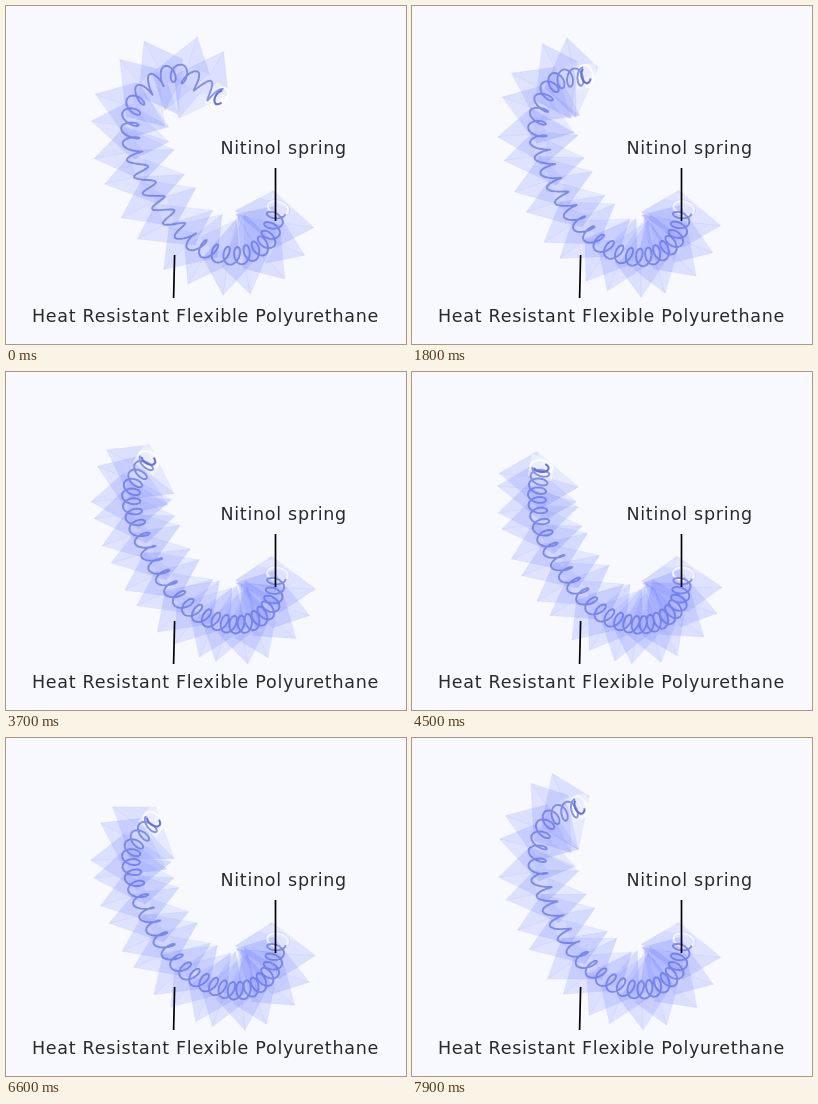
An HTML page with a canvas for the animation above (8 s loop, 400 by 338 pixels).

```html
<!DOCTYPE html>
<html lang="en">
<head>
<meta charset="utf-8">
<title>Soft actuator</title>
<style>
  html, body { margin: 0; width: 100%; height: 100%; overflow: hidden; background: #f7f9ff; }
  canvas, svg { position: absolute; left: 0; top: 0; width: 400px; height: 338px; }
  text { font: 17.5px "DejaVu Sans", sans-serif; letter-spacing: .71px; fill: #2a2a2e; }
  line { stroke: #000; stroke-width: 1.7; }
</style>
</head>
<body>
<canvas id="stage"></canvas>
<svg viewBox="0 0 400 338">
  <text x="214.5" y="147.5">Nitinol spring</text>
  <text x="26" y="316">Heat Resistant Flexible Polyurethane</text>
  <line x1="269.5" y1="162" x2="269.5" y2="215"/>
  <line x1="168.6" y1="249" x2="167.6" y2="292"/>
</svg>
<script>
const LOOP = 8000, STEP = 100, PERIOD = 10000;
const UNITS = 17, COILS = 27;

// Spine points, from the fixed end to the free tip, for four amounts of bend.
const BENDS = [1, .713, .437, .016];
const POSES = [
  [271,205, 259,237, 228,250, 187,236, 150,193, 126,140, 130,95, 169,67, 213,91],
  [271,205, 261,236, 234,251, 199,244, 165,214, 138,168, 125,119, 141,78, 173,70],
  [271,205, 262,236, 237,252, 205,247, 172,224, 145,183, 127,136, 129,97, 157,73],
  [271,205, 265,234, 244,250, 218,252, 187,239, 157,206, 133,165, 125,127, 128,97]
];

const canvas = document.getElementById('stage');
const ctx = canvas.getContext('2d');
const ratio = window.devicePixelRatio || 1;
canvas.width = 400 * ratio;
canvas.height = 338 * ratio;
ctx.scale(ratio, ratio);

// Smooth blend of the poses through all four bends.
function spineAt(bend) {
  const weights = BENDS.map((b, i) =>
    BENDS.reduce((w, c, j) => i === j ? w : w * (bend - c) / (b - c), 1));
  const flat = POSES[0].map((_, k) => POSES.reduce((s, p, i) => s + p[k] * weights[i], 0));
  const points = [];
  for (let k = 0; k < flat.length; k += 2) points.push([flat[k], flat[k + 1]]);
  return points;
}

function catmull(a, b, c, d, f) {
  return b + .5 * f * (c - a + f * (2*a - 5*b + 4*c - d + f * (3*(b - c) + d - a)));
}

function pointOn(spine, u) {
  const last = spine.length - 1;
  const s = Math.max(0, Math.min(1, u)) * last;
  const i = Math.min(last - 1, Math.floor(s));
  const get = (k, axis) => {
    if (k < 0) return 2 * spine[0][axis] - spine[1][axis];
    if (k > last) return 2 * spine[last][axis] - spine[last - 1][axis];
    return spine[k][axis];
  };
  return [0, 1].map(a => catmull(get(i - 1, a), get(i, a), get(i + 1, a), get(i + 2, a), s - i));
}

// Position, heading and local stretch of the spine at u.
function frameOn(spine, u) {
  const e = .01, [x, y] = pointOn(spine, u);
  const lo = Math.max(0, u - e), hi = Math.min(1, u + e);
  const p = pointOn(spine, lo), q = pointOn(spine, hi);
  const dx = q[0] - p[0], dy = q[1] - p[1];
  return { x, y, angle: Math.atan2(dy, dx), pace: Math.hypot(dx, dy) / (hi - lo) };
}

// The cells lean against the spine in its middle stretch.
const lean = u => .28 * Math.sin(Math.PI * u);

// Offset by `along` the heading and `out` to its left.
function offset(f, along, out, skew = 0) {
  const c = Math.cos(f.angle + skew), s = Math.sin(f.angle + skew);
  return [f.x + c * along + s * out, f.y + s * along - c * out];
}

function polygon(points, fill) {
  ctx.beginPath();
  points.forEach(p => ctx.lineTo(p[0], p[1]));
  ctx.closePath();
  ctx.fillStyle = fill;
  ctx.fill();
}

const blue = a => `rgba(92,106,255,${a})`;

function drawUnit(f, u, i) {
  const at = (a, o) => offset(f, a, o, lean(u));
  const side = i % 2 ? 1 : -1;
  const left = at(3 * side, 40), right = at(-3 * side, -40);
  const front = at(27, 9), back = at(-27, -9);
  const hub = at(4, 9 * side);
  polygon([left, front, right, back], blue(.1));
  polygon([left, front, hub], blue(.08));
  polygon([right, back, hub], blue(.12));
  polygon([left, hub, back], blue(.05));
  ctx.strokeStyle = blue(.1);
  ctx.lineWidth = .8;
  ctx.beginPath();
  [left, front, right, back, left, hub, right].forEach(p => ctx.lineTo(p[0], p[1]));
  ctx.stroke();
}

function drawSpring(spine) {
  ctx.beginPath();
  const steps = COILS * 20;
  for (let k = 0; k <= steps; k++) {
    const u = k / steps, f = frameOn(spine, u);
    const phase = u * COILS * 2 * Math.PI;
    const tight = Math.max(0, Math.min(1, (480 - f.pace) / 140));
    const p = offset(f, 5.2 * tight * Math.sin(phase), 9 * Math.cos(phase), lean(u));
    ctx.lineTo(p[0], p[1]);
  }
  ctx.strokeStyle = 'rgba(98,112,232,.75)';
  ctx.lineWidth = 1.9;
  ctx.lineJoin = 'round';
  ctx.stroke();
}

function ring(f, along, rx, ry, color, width) {
  const [x, y] = offset(f, along, 0);
  ctx.beginPath();
  ctx.ellipse(x, y, rx, ry, f.angle, 0, 2 * Math.PI);
  ctx.strokeStyle = color;
  ctx.lineWidth = width;
  ctx.stroke();
}

function drawTip(f) {
  const at = (a, o) => offset(f, a, o);
  polygon([at(13, 11), at(9, -13), at(-11, -12), at(-9, 12)], 'rgba(247,249,255,.5)');
  ring(f, 1, 7, 11, 'rgba(255,255,255,.8)', 2);
  const [x, y] = at(1, 0);
  ctx.beginPath();
  ctx.ellipse(x, y, 4.5, 7.5, f.angle, .5, 4.4);
  ctx.strokeStyle = 'rgba(70,86,225,.85)';
  ctx.lineWidth = 2;
  ctx.stroke();
}

function drawBase(f) {
  const at = (a, o) => offset(f, a, o);
  polygon([at(-12, 36), at(-18, -40), at(-7, -41), at(-7, 37)], 'rgba(247,249,255,.3)');
  ring(f, -3, 7, 11, 'rgba(247,249,255,.9)', 2.5);
  ring(f, -3, 8, 12, blue(.3), .8);
}

function draw(time) {
  const bend = (1 + Math.cos(2 * Math.PI * time / PERIOD)) / 2;
  const spine = spineAt(bend);
  ctx.clearRect(0, 0, 400, 338);
  for (let i = 0; i < UNITS; i++) {
    const u = .03 + .92 * i / (UNITS - 1);
    drawUnit(frameOn(spine, u), u, i);
  }
  drawBase(frameOn(spine, 0));
  drawTip(frameOn(spine, 1));
  drawSpring(spine);
}

function tick() {
  draw(Math.floor(performance.now() % LOOP / STEP) * STEP);
  requestAnimationFrame(tick);
}
tick();
</script>
</body>
</html>
```
